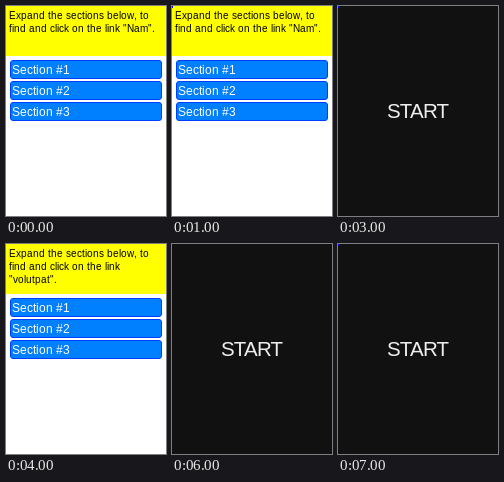
An HTML page with a canvas that plays this animation: 160x210 px, repeating every 8 s.

```html
<!DOCTYPE html>
<html>
<head>
<meta charset="utf-8">
<style>
  html, body { margin: 0; overflow: hidden; background: #fff; }
  canvas { display: block; }
</style>
</head>
<body>
<canvas id="stage" width="160" height="210"></canvas>
<script>
const ctx = document.getElementById('stage').getContext('2d');
const FONT = '"Liberation Sans", Arial, sans-serif';
const HEAD = 'Expand the sections below, to';
const TASKS = [
  [HEAD, 'find and click on the link "Nam".'],
  [HEAD, 'find and click on the link', '"volutpat".']
];

function rect(color, x, y, w, h) {
  ctx.fillStyle = color;
  ctx.fillRect(x, y, w, h);
}

// Text with whole-pixel letter advances
function text(str, x, y, size, color) {
  ctx.font = `${size}px ${FONT}`;
  ctx.textAlign = 'left';
  ctx.letterSpacing = '0px';
  ctx.fillStyle = color;
  for (const ch of str) {
    ctx.fillText(ch, x, y);
    x += Math.round(ctx.measureText(ch).width);
  }
}

function drawTask(lines) {
  rect('#fff', 0, 0, 160, 210);
  rect('#ff0', 0, 0, 160, 50);
  lines.forEach((line, i) => text(line, 3, 13 + 13 * i, 10, '#000'));
  for (let i = 0; i < 3; i++) {
    const y = 54 + 21 * i;
    ctx.beginPath();
    ctx.roundRect(4.5, y + 0.5, 151, 18, 2.5);
    ctx.fillStyle = '#007fff';
    ctx.fill();
    ctx.strokeStyle = '#003eff';
    ctx.stroke();
    text(`Section #${i + 1}`, 6, y + 14, 12, '#fff');
  }
}

function drawCover() {
  rect('#111', 0, 0, 160, 210);
  ctx.font = `20.5px ${FONT}`;
  ctx.textAlign = 'center';
  ctx.letterSpacing = '-0.8px';
  ctx.fillStyle = '#eee';
  ctx.fillText('START', 79.6, 112);
}

function frame() {
  const second = Math.floor(performance.now() / 1000) % 8;
  if (second % 4 < 2) drawTask(TASKS[second >> 2]);
  else drawCover();
  // Pointer tip in the corner
  if (second % 2) rect('#00f', 0, 0, 1, 2);
  requestAnimationFrame(frame);
}
frame();
</script>
</body>
</html>
```
